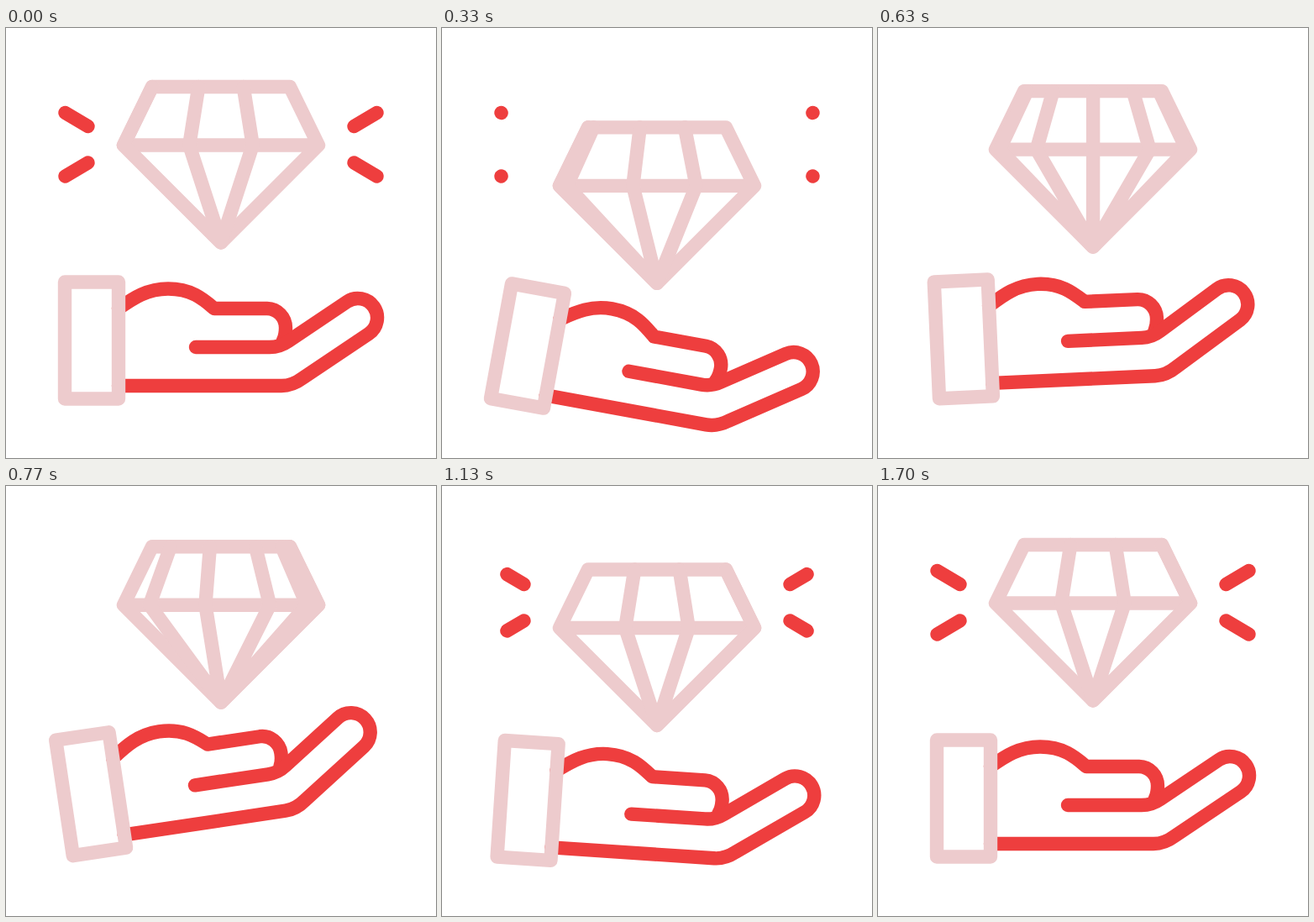
These frames come from a looping animation (512 by 512 pixels, 2 s). An HTML page:

```html
<!DOCTYPE html>
<html lang="en">
<head>
<meta charset="utf-8">
<title>Diamond over an open hand</title>
<style>
  html, body { margin: 0; width: 100%; height: 100%; overflow: hidden; background: #fff; }
  svg { display: block; width: 100%; height: 100%; }
  path { fill: none; stroke-width: 16.4; stroke-linecap: round; stroke-linejoin: round; }
  .red { stroke: #ee3e3e; }
  .pink { stroke: #edcbcd; }
</style>
</head>
<body>
<svg viewBox="0 0 512 512">
  <path id="rays" class="red"/>
  <g id="hand">
    <path class="red" d="M134 334C150 323 167 310.5 193 310.5C221 310.5 235 323 248 334H311
      A22.5 23 0 0 1 333 357Q333 366 330 372"/>
    <path class="red" d="M226 380H314Q326 380 336 373L406 326A23 23 0 0 1 432 364
      L353 417Q341 426 328 426H134"/>
    <path class="pink" d="M70 302.5H134V441.5H70Z"/>
  </g>
  <g id="diamond">
    <path class="pink" d="M174 70H338L372 139.5L256 255.5L140 139.5ZM140 139.5H372"/>
    <path id="facets" class="pink"/>
  </g>
</svg>
<script>
  const LOOP = 2000, STEP = 1000 / 30, LAST = 51;
  const $ = id => document.getElementById(id);
  const clamp = (v, lo, hi) => Math.min(hi, Math.max(lo, v));

  // Progress from a to b, linear and eased
  const ramp = (t, a, b) => clamp((t - a) / (b - a), 0, 1);
  const ease = (t, a, b) => {
    const x = ramp(t, a, b);
    return x * x * (3 - 2 * x);
  };

  // Eased value through [time, value] keys
  const track = (keys, t) => keys.slice(1).reduce(
    (v, [time, value], i) => v + (value - keys[i][1]) * ease(t, keys[i][0], time), keys[0][1]);

  const LIFT = [[0, 0], [367, 49.5], [700, 0], [1100, 30], [1520, 0]];
  const TILT = [[0, 0], [400, 11.2], [767, -8.5], [1133, 3.8], [1433, -1.35], [1700, 0]];

  // One edge of the turning stone: rim, girdle, tip
  function facet(angle) {
    const u = Math.sin(clamp(angle, -90, 90) * Math.PI / 180);
    return `M${256 + 82 * u} 70L${256 + 116 * u} 139.5L256 255.5`;
  }

  function facets(t) {
    const turn = 109 * ease(t, 233, 1033);
    const across = -90 + 180 * ramp(t, 233, 1033);
    return [turn - 19, turn + 19, across, turn - 90, turn - 128].map(facet).join('');
  }

  // Rays retract outwards, then grow from their inner ends
  function rays(t) {
    if (t > 350 && t < 930) return '';
    const from = t < 600 ? 0 : 1 - ease(t, 917, 1240);
    const to = t < 600 ? 1 - ease(t, 0, 345) : 1;
    const point = (k, sx, sy) =>
      `${256 + sx * (185.5 - 27 * k)} ${138.75 + sy * (37.75 - 16 * k)}`;
    return [[-1, -1], [-1, 1], [1, -1], [1, 1]]
      .map(([sx, sy]) => `M${point(from, sx, sy)}L${point(to, sx, sy)}`).join('');
  }

  function draw(now) {
    const t = Math.min(LAST, Math.floor((now % LOOP + 4) / STEP)) * STEP;
    $('diamond').setAttribute('transform', `translate(0 ${track(LIFT, t)})`);
    $('hand').setAttribute('transform', `rotate(${track(TILT, t)} 66 375)`);
    $('facets').setAttribute('d', facets(t));
    $('rays').setAttribute('d', rays(t));
  }

  const start = performance.now();
  function tick() {
    draw(performance.now() - start);
    requestAnimationFrame(tick);
  }
  tick();
</script>
</body>
</html>
```
